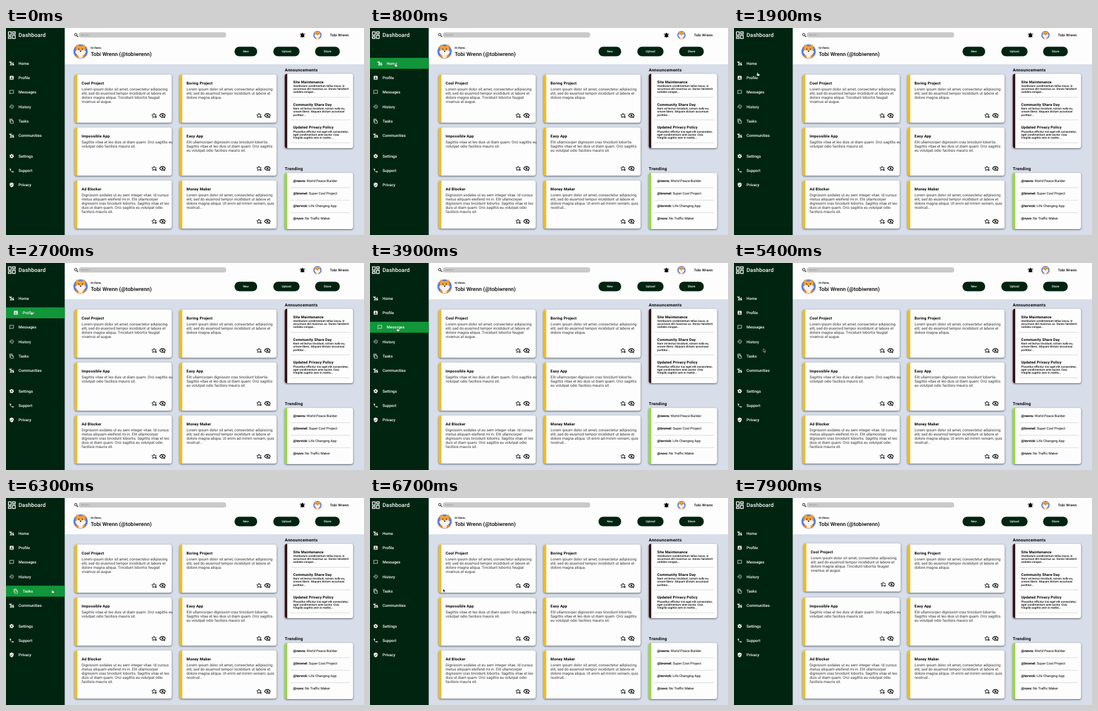
Animation of 600 by 348 pixels, one loop 8000 ms. Source, as an HTML page:

```html
<!DOCTYPE html>
<html lang="en">
<head>
<meta charset="utf-8">
<title>Dashboard</title>
<style>
  html, body { margin: 0; width: 100%; height: 100%; overflow: hidden; background: #d7dee9; }
  svg { display: block; width: 600px; height: 348px; }
  text { font-family: Roboto, Arial, sans-serif; text-rendering: geometricPrecision; white-space: pre; }
  .panel { filter: drop-shadow(.3px 1px 1.4px rgba(0, 0, 0, .6)); }
</style>
</head>
<body>
<svg id="stage" viewBox="0 0 600 348" xmlns="http://www.w3.org/2000/svg"></svg>
<script>
const GREEN = '#012411', SIDE = 98.4, LOOP = 8000, STEP = 100;

// Icons on a 24-unit grid
const stroke = (d, w = 2) => `<path d="${d}" fill="none" stroke="currentColor" stroke-width="${w}"/>`;
const solid = d => `<path d="${d}" fill="currentColor" fill-rule="evenodd"/>`;
const plus = `<path d="M18.5 14v8M14.5 18h8" stroke="#fdfdfd" stroke-width="5"/>` + stroke('M18.5 14v8M14.5 18h8', 2.4);
const ICONS = {
  grid: stroke('M3 3h7v9H3zM14 3h7v5h-7zM14 12h7v9h-7zM3 16h7v5H3z', 2.2),
  people: `<g fill="currentColor"><circle cx="9" cy="5" r="2.6"/><circle cx="18.5" cy="10" r="2.4"/></g>` +
    stroke('M2 3q1 7 7 7 4 0 6 4l2 1h4v7M9 10v6l-5 6M9 15l3 7M17 15v7', 3),
  profile: solid('M3 5v14a2 2 0 0 0 2 2h14a2 2 0 0 0 2-2V5a2 2 0 0 0-2-2H5a2 2 0 0 0-2 2zm12 4a3 3 0 1 1-6 0 3 3 0 0 1 6 0zm-9 8c0-2 4-3.1 6-3.1s6 1.1 6 3.1v1H6z'),
  message: stroke('M3 3h18v14H6l-3 3z'),
  history: stroke('M5 12a8 8 0 1 1 2.4 5.7M12.5 8v5l4 2.3') + solid('M1 12h8l-4 4z'),
  tasks: stroke('M3 18V2h13M7 6h8l5 5v11H7zM14 6v6h6'),
  cog: `<g fill="none" stroke="currentColor"><circle cx="12" cy="12" r="5.6" stroke-width="4.4"/>
    <circle cx="12" cy="12" r="8.6" stroke-width="3.2" stroke-dasharray="4.5 4.505"/></g>`,
  phone: solid('M6.6 10.8a15 15 0 0 0 6.6 6.6l2.2-2.2a1 1 0 0 1 1-.2c1.1.4 2.3.6 3.6.6a1 1 0 0 1 1 1V20a1 1 0 0 1-1 1A17 17 0 0 1 3 4a1 1 0 0 1 1-1h3.5a1 1 0 0 1 1 1c0 1.3.2 2.5.6 3.6a1 1 0 0 1-.2 1z'),
  shield: solid('M12 1 3 5v6c0 5.5 3.8 10.7 9 12 5.2-1.3 9-6.5 9-12V5zm-2 16-4-4 1.4-1.4L10 14.2l6.6-6.6L18 9z'),
  search: `<circle cx="9.5" cy="9.5" r="5.8" fill="none" stroke="currentColor" stroke-width="2.6"/>` + stroke('M14 14l7 7', 3),
  bell: solid('M21 19v1H3v-1l2-2v-6c0-3.1 2-5.8 5-6.7V4a2 2 0 0 1 4 0v.3c3 .9 5 3.6 5 6.7v6zm-7 2a2 2 0 0 1-4 0z') +
    stroke('M19 4a10 10 0 0 1 3 7M5 4a10 10 0 0 0-3 7'),
  star: stroke('M11.5 3l2.6 6.1 6.6.6-5 4.3 1.5 6.5-5.7-3.4-5.7 3.4 1.5-6.5-5-4.3 6.6-.6z', 2.2) + plus,
  eye: stroke('M1.5 12C4 7 8 5 12 5s8 2 10.5 7C20 17 16 19 12 19S4 17 1.5 12z', 2.4) +
    `<circle cx="12" cy="12" r="3.5" fill="currentColor"/>` + plus
};

const icon = (name, cx, cy, size, color = '#000') =>
  `<g color="${color}" transform="translate(${cx - size / 2} ${cy - size / 2}) scale(${size / 24})">${ICONS[name]}</g>`;
const label = (x, y, size, str, { weight = 400, fill = '#000', gap = 0, anchor = 'start' } = {}) =>
  `<text x="${x}" y="${y}" font-size="${size}" font-weight="${weight}" fill="${fill}" letter-spacing="${gap}" text-anchor="${anchor}">${str}</text>`;
const rect = (x, y, w, h, fill, r = 0) => `<rect x="${x}" y="${y}" width="${w}" height="${h}" rx="${r}" fill="${fill}"/>`;
const lines = (x, y, size, lead, str, style) =>
  str.split('|').map((s, i) => label(x, y + i * lead, size, s, style)).join('');

// White box with a coloured strip along its left side
const panel = (x, y, w, h, strip, color) => `<g class="panel">${rect(x, y, w, h, '#fdfdfd', 4)}
  <path d="M${x + strip} ${y}v${h}h${4 - strip}a4 4 0 0 1-4-4v${8 - h}a4 4 0 0 1 4-4z" fill="${color}"/></g>`;

const fox = (x, y, k) => `<g transform="translate(${x} ${y}) scale(${k})">
  <circle r="12" fill="#5a7fe0"/>
  <path d="M-6 3h12l2 6Q0 14-8 9z" fill="#f08a24"/>
  <path d="M-7-12-2-9H2L7-12 8-3Q5 2 0 2-5 2-8-3z" fill="#f7a02f"/>
  <path d="M-9 0-5-3-2-1 0-3 2-1 5-3 9 0Q8 6 0 8-8 6-9 0z" fill="#fbf3ea"/>
  <path d="M-4 6Q0 9 4 6L3 11H-3z" fill="#fbf3ea"/>
  <circle cx="-3" cy="-4" r=".9" fill="#37283c"/><circle cx="3" cy="-4" r=".9" fill="#37283c"/>
  <circle cy="-.6" r="1.2" fill="#37283c"/></g>`;

const NAV = [
  ['Home', 'people', 59.4, 600, 1800], ['Profile', 'profile', 83.8, 1900, 2900],
  ['Messages', 'message', 108, 3000, 4000], ['History', 'history', 132.2, 4300, 5100],
  ['Tasks', 'tasks', 156.6, 5600, 6600], ['Communities', 'people', 180.8],
  ['Settings', 'cog', 215.4], ['Support', 'phone', 239.6], ['Privacy', 'shield', 263.8]
];

const CARDS = [
  ['Cool Project', 'Lorem ipsum dolor sit amet, consectetur adipiscing|elit, sed do eiusmod tempor incididunt ut labore et|dolore magna aliqua. Tincidunt lobortis feugiat|vivamus at augue.'],
  ['Boring Project', 'Lorem ipsum dolor sit amet, consectetur adipiscing|elit, sed do eiusmod tempor incididunt ut labore et|dolore magna aliqua.'],
  ['Impossible App', 'Sagittis vitae et leo duis ut diam quam. Orci sagittis eu|volutpat odio facilisis mauris sit.'],
  ['Easy App', 'Elit ullamcorper dignissim cras tincidunt lobortis.|Sagittis vitae et leo duis ut diam quam. Orci sagittis|eu volutpat odio facilisis mauris sit.'],
  ['Ad Blocker', 'Dignissim sodales ut eu sem integer vitae. Id cursus|metus aliquam eleifend mi in. Elit ullamcorper|dignissim cras tincidunt lobortis. Sagittis vitae et leo|duis ut diam quam. Orci sagittis eu volutpat odio|facilisis mauris sit.'],
  ['Money Maker', 'Lorem ipsum dolor sit amet, consectetur adipiscing|elit, sed do eiusmod tempor incididunt ut labore et|dolore magna aliqua. Ut enim ad minim veniam, quis|nostrud...']
];

const NEWS = [
  ['Site Maintenance', 'Vestibulum condimentum tellus lacus, in|accumsan elit maximus ac. Donec hendrerit|sodales congue...'],
  ['Community Share Day', 'Nam vel lectus tincidunt, rutrum nulla eu,|ornare libero. Aliquam dictum accumsan|porttitor...'],
  ['Updated Privacy Policy', 'Phasellus efficitur nisi eget elit consectetur,|eget condimentum ante auctor. Cras|fringilla sagittis sem in mattis...']
];

const TRENDS = [
  ['@nevra', 'World Peace Builder'], ['@bromel', 'Super Cool Project'],
  ['@torvick', 'Life Changing App'], ['@ruvo', 'No Traffic Maker']
];

const rule = y => rect(477, y, 99.5, .6, '#c4c4c4');

const sidebar = () => rect(0, 0, SIDE, 348, GREEN) +
  icon('grid', 9.8, 12, 15, '#fff') +
  label(21, 15.3, 9.2, 'Dashboard', { weight: 500, fill: '#fff', gap: .1 }) +
  NAV.map(([name, pic, y]) => `<g class="nav"><g opacity="0">${rect(0, y - 9.2, SIDE, 18.4, '#11963a')}</g>
    <g>${icon(pic, 9.5, y, 8.6, '#fff')}${label(21, y + 2.4, 6.5, name, { weight: 500, fill: '#fff' })}</g></g>`).join('');

const header = () => rect(SIDE, 0, 600 - SIDE, 61, '#fdfdfd') +
  icon('search', 117.8, 12, 8.5) + rect(122, 7.2, 247, 8.8, '#c9c9c9', 4) +
  label(125.5, 13.1, 4.3, 'Search...', { fill: '#939393' }) +
  icon('bell', 496.8, 12, 9.5) + fox(522, 12, .58) +
  label(543, 13.8, 6, 'Tobi Wrenn', { weight: 500, gap: .15 }) +
  fox(125, 39.5, 1) + label(142, 35.2, 4.8, 'Hi there,', { weight: 500 }) +
  label(142, 46.6, 9.05, 'Tobi Wrenn (@tobiwrenn)', { weight: 500 }) +
  [['New', 383, 38], ['Upload', 448, 44], ['Share', 518, 41.5]].map(([s, x, w]) =>
    rect(x, 31.5, w, 16, GREEN, 8) +
    label(x + w / 2, 41.3, 4.9, s, { weight: 500, fill: '#fff', anchor: 'middle' })).join('');

const cards = () => CARDS.map(([title, body], i) => {
  const x = 115.1 + i % 2 * 175.8, y = 78.2 + (i >> 1) * 89;
  return `<g class="card">${panel(x, y, 162.7, 81, 4.5, '#f0bc1f')}
    ${label(x + 11.7, y + 16.5, 6.4, title, { weight: 700, gap: .19 })}
    ${lines(x + 11.7, y + 27.2, 6.33, 7, body, { fill: '#333' })}
    ${icon('star', x + 133.3, y + 68.8, 10)}${icon('eye', x + 147.2, y + 68.8, 10.8)}</g>`;
}).join('');

const aside = () => label(467.3, 72.6, 7, 'Announcements', { weight: 700, gap: .3 }) +
  panel(467.3, 77, 114.5, 125, 4, '#300a0a') +
  NEWS.map(([title, body], i) => {
    const y = 92.8 + i * 38.3;
    return label(481.3, y, 6.2, title, { weight: 700, gap: .16 }) +
      lines(481.3, y + 6.2, 4.75, 5.1, body, { weight: 500 }) + rule(y + 23.3);
  }).join('') +
  label(467.3, 239.3, 7, 'Trending', { weight: 700, gap: .3 }) +
  panel(467.3, 243.5, 114.5, 94.5, 4, '#90dc35') +
  TRENDS.map(([who, what], i) => {
    const y = 259 + i * 21.1;
    return label(481.3, y, 5.75, `<tspan font-weight="700">${who}:</tspan> ${what}`) + (i < 3 ? rule(y + 9.2) : '');
  }).join('');

const pointer = () => `<g id="cursor" stroke-linejoin="round">
  <path d="M0 0v6.5l1.5-1.4 1.1 2.5 1.1-.5-1.1-2.4h2z" fill="#000" stroke="#fff" stroke-width=".6"/>
  <path d="M-.8.7a.8.8 0 0 1 1.6 0v2l2.3.6q.9.2.8 1.1L3.5 7H0L-2.3 4.3Q-2 3.3-.8 4z" fill="#fff" stroke="#222" stroke-width=".6"/></g>`;

const stage = document.getElementById('stage');
stage.innerHTML = rect(0, 0, 600, 348, '#d7dee9') + cards() + aside() + header() + sidebar() + pointer();

const navs = [...stage.querySelectorAll('.nav')];
const card = stage.querySelector('.card');
const cursor = document.getElementById('cursor');
const [arrow, hand] = cursor.children;

// Pointer tip: time, x, y
const PATH = [
  [100, 288, 205], [300, 190, 140], [600, 45, 60], [1000, 40, 58], [1700, 39, 63],
  [1900, 39.5, 74.6], [2100, 40, 79], [2700, 41.8, 80.8], [2900, 42.5, 91], [3100, 44, 102],
  [3900, 46, 108.8], [4100, 47, 119], [4300, 48, 127], [5000, 49, 137], [5400, 49.2, 144],
  [5600, 55, 151], [6300, 77.5, 153.8], [6600, 95, 155], [6800, 150, 150], [7000, 215, 146],
  [7300, 215, 146], [7900, 250, 141]
];

const clamp = v => Math.max(0, Math.min(1, v));
const ease = v => v * v * (3 - 2 * v);
const hover = (t, on, off) => t <= off ? ease(clamp((t - on) / 200)) : clamp(1 - (t - off) / 100);

function tip(t) {
  const i = PATH.findIndex(p => p[0] > t);
  if (i < 0) return PATH[PATH.length - 1].slice(1);
  if (i === 0) return PATH[0].slice(1);
  const [a, b] = [PATH[i - 1], PATH[i]], k = (t - a[0]) / (b[0] - a[0]);
  return [a[1] + (b[1] - a[1]) * k, a[2] + (b[2] - a[2]) * k];
}

function draw(t) {
  NAV.forEach(([, , , on, off], i) => {
    if (!on) return;
    const k = hover(t, on, off), [bar, item] = navs[i].children;
    bar.setAttribute('opacity', k);
    item.setAttribute('transform', `translate(${7 * k} 0)`);
  });
  const lift = hover(t, 6800, LOOP);
  card.setAttribute('transform', `translate(${1.7 * lift} ${-2 * lift})`);

  const linked = t >= 7500 || NAV.some(([, , , on, off]) => t >= on && t < off);
  arrow.setAttribute('visibility', linked ? 'hidden' : 'inherit');
  hand.setAttribute('visibility', linked ? 'inherit' : 'hidden');
  cursor.setAttribute('visibility', t < 100 ? 'hidden' : 'visible');
  cursor.setAttribute('transform', `translate(${tip(t).join(' ')}) scale(.88)`);
}

const start = performance.now();
function tick() {
  const t = (performance.now() - start) % LOOP;
  draw(Math.floor(t / STEP) * STEP);
  requestAnimationFrame(tick);
}
tick();
</script>
</body>
</html>
```
